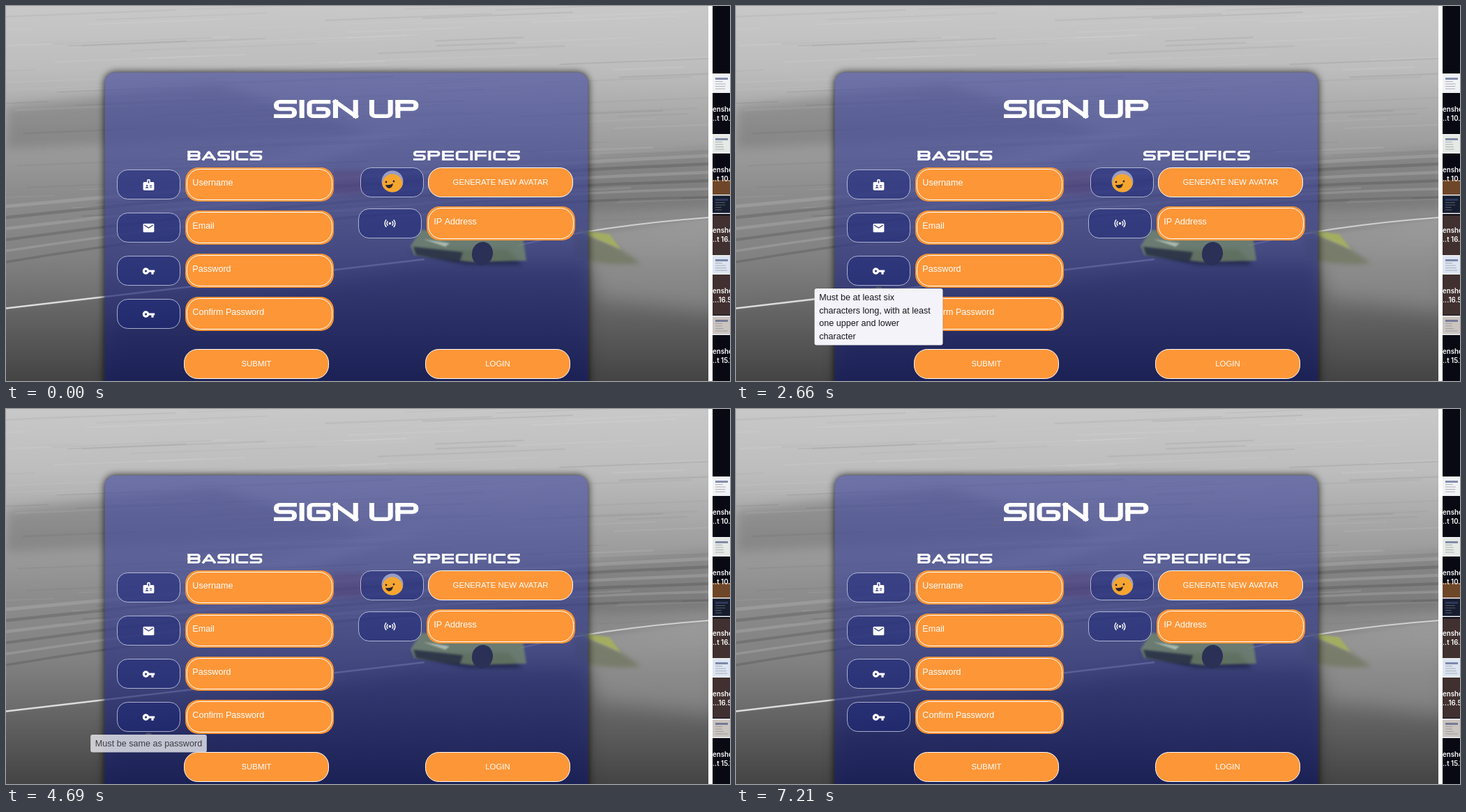
These frames come from a looping animation (1038x539 px, 7560 ms). An HTML page with a canvas:

```html
<!DOCTYPE html>
<html lang="en">
<head>
<meta charset="utf-8">
<title>Sign up</title>
<style>
html, body { margin: 0; width: 100%; height: 100%; overflow: hidden; background: #fff; }
canvas { display: block; }
</style>
</head>
<body>
<canvas id="stage" width="1038" height="539" role="img" aria-label="Sign up form with tooltips"></canvas>
<script>
const W = 1038, H = 539, LOOP = 7560, STEP = 70, FADE = 200;
const SANS = '"Liberation Sans", Arial, sans-serif';
const TEXT = `12.6px ${SANS}`;
const ORANGE = '#fd9637';
const view = document.getElementById('stage').getContext('2d');
const page = document.createElement('canvas');
page.width = W; page.height = H;
const g = page.getContext('2d');

let seed = 11;
const rnd = () => (seed = (seed * 16807) % 2147483647) / 2147483647;

// Evenly spaced colours from y0 to y1.
function shade(y0, y1, ...colors) {
  const grad = g.createLinearGradient(0, y0, 0, y1);
  colors.forEach((color, i) => grad.addColorStop(i / (colors.length - 1), color));
  return grad;
}

function soft(d, fill, blur) {
  g.save();
  g.filter = `blur(${blur}px)`;
  g.fillStyle = fill;
  g.fill(new Path2D(d));
  g.restore();
}

function curve(d, color, width) {
  g.strokeStyle = color;
  g.lineWidth = width;
  g.stroke(new Path2D(d));
}

function box(c, x, y, w, h, r, fill, line) {
  c.beginPath();
  c.roundRect(x, y, w, h, r);
  if (fill) { c.fillStyle = fill; c.fill(); }
  if (line) { c.strokeStyle = line; c.lineWidth = 1; c.stroke(); }
}

function label(c, str, x, y, font, color = '#fff', align = 'left') {
  c.font = font;
  c.fillStyle = color;
  c.textAlign = align;
  c.fillText(str, x, y);
}

function photo() {
  g.fillStyle = shade(0, H, '#c8c8c8', '#bdbdbd', '#a2a2a2', '#8c8c8c', '#828282', '#666', '#484848');
  g.fillRect(0, 0, W, H);
  soft('M0 145L300 112L520 180L0 205z', 'rgba(80,80,80,.3)', 8);
  soft('M230 245L640 160L420 235z', 'rgba(215,215,220,.3)', 7);
  soft('M420 255L1010 205V290L640 300z', 'rgba(80,80,80,.25)', 6);
  for (let i = 0; i < 150; i++) {
    const x = rnd() * 1000 - 80, y = rnd() * 320, len = 60 + rnd() * 260;
    const tone = rnd() < .5 ? '60,60,60' : '235,235,235';
    curve(`M${x} ${y}l${len} ${-len * .04}`, `rgba(${tone},${.03 + rnd() * .08})`, 1 + rnd() * 2);
  }
  // guard rails converge towards the right
  for (let i = 0; i < 6; i++)
    curve(`M0 ${288 + i * 16}Q500 ${240 + i * 9} 1007 ${215 + i * 12}`, `rgba(${i % 2 ? '60,60,60' : '200,200,200'},.25)`, 5 - i / 3);
  soft('M468 236h44v36h-44z', 'rgba(150,50,45,.4)', 4);
  // road
  soft('M-20 440L600 367L1020 303V560H-20z', shade(300, H, '#999', '#777', '#5e5e5e', '#444'), 2);
  soft('M150 460L590 374L835 372V560H150z', 'rgba(40,40,40,.4)', 12);
  soft('M820 330L1020 303V440L850 420z', 'rgba(170,170,170,.4)', 14);
  curve('M0 434.5L141 418Q400 388 600 364', '#dcdcdc', 2.3);
  curve('M735 344Q850 316 1007 304', 'rgba(225,225,225,.8)', 2);
  // tail and wing
  soft('M815 330Q860 330 910 370Q860 375 815 362z', 'rgba(110,116,90,.7)', 3);
  soft('M815 321L865 328L882 350L845 334z', '#a3ad62', 1.5);
}

function carFront() {
  soft('M578 352L660 372L740 372L720 350z', 'rgba(20,26,50,.6)', 3);
  soft('M580 345L595 322L740 325L746 366L668 368L585 358z', 'rgba(126,150,105,.65)', 1.5);
  soft('M584 346L655 354L650 369L588 358z', 'rgba(38,46,70,.85)', 1.5);
  soft('M598 335L636 341L630 346z', 'rgba(215,225,215,.6)', 1);
  g.fillStyle = '#2b3156';
  g.beginPath(); g.ellipse(683, 356, 15, 17, .2, 0, 7); g.fill();
}

function panel() {
  // shadow only outside the translucent card
  const card = [141.5, 95.5, 693, 480, 15];
  const outside = new Path2D();
  outside.rect(0, 0, 1007, H);
  outside.roundRect(...card);
  g.save();
  g.clip(outside, 'evenodd');
  g.shadowColor = 'rgba(0,0,0,.85)';
  g.shadowBlur = 11;
  box(g, ...card, '#333');
  g.restore();
  box(g, ...card, shade(95, H, 'rgba(74,80,158,.68)', 'rgba(62,70,148,.69)', 'rgba(40,48,122,.74)', 'rgba(20,27,92,.8)'));
}

// Wide display lettering: each pair is a grid point on a 0-4 square.
const GLYPHS = {
  S: [1.27, '40 00 02 42 44 04'], I: [.28, '00 04'], G: [1.3, '40 00 04 44 42 22'],
  N: [1.38, '04 00|00 44|44 40'], U: [1.3, '00 04 44 40'], P: [1.27, '04 00|00 40 42 02'],
  B: [1.3, '00 04|00 40 42 02|02 42 44 04'], A: [1.42, '04 20 44|13 33'],
  C: [1.27, '40 00 04 44'], E: [1.2, '00 04|00 40|02 42|04 44'], F: [1.2, '00 04|00 40|02 42']
};

function wide(word, x, y, h, gap) {
  const pen = h * .21, broad = 1.3;
  g.save();
  g.translate(x, y);
  g.scale(broad, 1);
  g.strokeStyle = '#fff';
  g.lineWidth = pen;
  g.lineCap = 'square';
  g.lineJoin = 'round';
  let left = 0;
  for (const ch of word) {
    if (ch === ' ') { left += (h * .62 - gap) / broad; continue; }
    const [ratio, strokes] = GLYPHS[ch];
    const w = ratio * h / broad;
    for (const stroke of strokes.split('|')) {
      const pts = stroke.split(' ').map(p => [
        left + pen / 2 + p[0] / 4 * (w - pen), pen / 2 + p[1] / 4 * (h - pen)]);
      const last = pts.length - 1;
      g.beginPath();
      g.moveTo(...pts[0]);
      for (let i = 1; i < last; i++) g.arcTo(...pts[i], ...pts[i + 1], ch === 'A' ? h * .03 : h * .15);
      g.lineTo(...pts[last]);
      g.stroke();
    }
    left += w + gap / broad;
  }
  g.restore();
}

const ICONS = {
  badge: 'M20 7h-5V4c0-1.1-.9-2-2-2h-2c-1.1 0-2 .9-2 2v3H4c-1.1 0-2 .9-2 2v11c0 1.1.9 2 2 2h16c1.1 0 2-.9 2-2V9c0-1.1-.9-2-2-2zM11 4h2v5h-2zM9 12a1.5 1.5 0 1 1 0 3a1.5 1.5 0 1 1 0-3zM6 18c0-3 6-3 6 0zM14 13h4v1.5h-4zM14 16h4v1.5h-4z',
  mail: 'M20 4H4c-1.1 0-2 .9-2 2v12c0 1.1.9 2 2 2h16c1.1 0 2-.9 2-2V6c0-1.1-.9-2-2-2zm0 4l-8 5-8-5V6l8 5 8-5v2z',
  key: 'M12.65 10C11.83 7.67 9.61 6 7 6c-3.31 0-6 2.69-6 6s2.69 6 6 6c2.61 0 4.83-1.67 5.65-4H17v4h4v-4h2v-4H12.65zM7 14c-1.1 0-2-.9-2-2s.9-2 2-2 2 .9 2 2-.9 2-2 2z'
};

function icon(name, x, y) {
  g.save();
  g.translate(x, y);
  g.scale(.79, .79);
  g.translate(-12, -12);
  g.fillStyle = '#fff';
  g.fill(new Path2D(ICONS[name]), 'evenodd');
  g.restore();
}

function signal(x, y) {
  g.fillStyle = g.strokeStyle = '#fff';
  g.lineWidth = 1.5;
  g.beginPath(); g.arc(x, y, 1.8, 0, 7); g.fill();
  for (const r of [4.4, 7.4]) for (const a of [0, Math.PI]) {
    g.beginPath(); g.arc(x, y, r, a - .8, a + .8); g.stroke();
  }
}

function avatar(x, y) {
  const disc = (dx, dy, r, color) => {
    g.fillStyle = color;
    g.beginPath(); g.arc(dx, dy, r, 0, 7); g.fill();
  };
  g.save();
  g.translate(x, y);
  g.beginPath(); g.arc(0, 0, 15.5, 0, 7); g.clip();
  disc(0, 0, 16, '#989dc4');
  disc(0, 4, 14.5, '#f6a630');
  disc(-9, 1, 1.4, '#2c2430');
  disc(2, 0, 1.4, '#2c2430');
  g.fill(new Path2D('M-10 5Q-4 6 1 3Q0 10-5 10Q-9 9-10 5'));
  g.restore();
}

const chip = (x, y) => box(g, x + .5, y + .5, 90, 42, 15, 'rgba(28,38,120,.5)', 'rgba(225,228,245,.7)');

function field(x, y, str) {
  box(g, x, y, 213, 49, 19, ORANGE);
  box(g, x + 2.5, y + 2.5, 208, 44, 19, null, '#fff');
  label(g, str, x + 10.3, y + 26, TEXT);
}

function button(x, y, str) {
  box(g, x + .5, y + .5, 207, 42, 19, ORANGE, '#fff');
  label(g, str, x + 104, y + 25, `11.4px ${SANS}`, '#fff', 'center');
}

function form() {
  wide('SIGN UP', 384, 135, 26, 3.6);
  wide('BASICS', 260.5, 208, 14, 2.3);
  wide('SPECIFICS', 584, 208, 14, 2.8);
  [['Username', 'badge'], ['Email', 'mail'], ['Password', 'key'], ['Confirm Password', 'key']].forEach(([str, name], i) => {
    const y = 235 + i * 62;
    chip(159, y);
    icon(name, 204.5, y + 22);
    field(257, y - 3, str);
  });
  chip(508, 232);
  avatar(554, 252);
  button(605, 232, 'GENERATE NEW AVATAR');
  chip(505, 291);
  signal(550.5, 312.5);
  field(603, 288, 'IP Address');
  button(255, 493, 'SUBMIT');
  button(601, 493, 'LOGIN');
}

function desktop() {
  const x = 1013, w = 25, gap = 87;
  const rect = (y, h, color) => { g.fillStyle = color; g.fillRect(x, y, w, h); };
  g.fillStyle = '#fff';
  g.fillRect(1007, 0, 31, H);
  rect(0, H, '#090914');
  rect(250, 21, '#6e4728');
  rect(301, 143, '#40302f');
  ['#f0f2f5', '#e6eae6', '#161d2e', '#dce5f1', '#cbc4bf'].forEach((color, i) => {
    const top = 97 + i * gap;
    rect(top, 28, '#f0f0f2');
    rect(top + 1.5, 25, color);
    g.fillStyle = 'rgba(60,75,125,.6)';
    g.fillRect(x + 4, top + 6, 18, 3);
    g.fillStyle = 'rgba(130,135,145,.6)';
    for (let k = 0; k < 4; k++) g.fillRect(x + 4, top + 11 + k * 3.5, 8 + rnd() * 10, 1);
  });
  ['..t 10.1', '..t 10.1', '..t 16.4', '...16.5', '..t 15.1'].forEach((tail, i) => {
    const y = 151.5 + i * gap;
    label(g, 'ensho', x, y, '600 9.7px Inter, sans-serif');
    label(g, tail, x, y + 13, '600 9.7px Inter, sans-serif');
  });
}

// Each tip hangs below the chip centred at x and is hovered from show to hide.
const TIPS = [
  { x: 204.5, y: 282, show: 190, hide: 680, text: 'Must be a valid username' },
  { x: 204.5, y: 344, show: 890, hide: 2010, text: 'Must contain at least two\ncharcters seperated by an @' },
  { x: 204.5, y: 406, show: 2080, hide: 3410, text: 'Must be at least six\ncharacters long, with at least\none upper and lower\ncharacter' },
  { x: 204.5, y: 468, show: 4110, hide: 4630, text: 'Must be same as password' },
  { x: 551, y: 338, show: 5930, hide: 6980, text: "Must contain four number\nbetween 0 and 256 seperate\nby 4 .'s eg 123.123.123.123" }
];

const clamp = v => Math.max(0, Math.min(1, v));
const ease = v => v * v * (3 - 2 * v);

function tip({ x, y, show, hide, text }, t) {
  const alpha = ease(clamp((t - show) / FADE)) - ease(clamp((t - hide) / FADE));
  if (alpha <= 0) return;
  // grows to full size ahead of the fade, shrinks behind it
  const size = .75 + .25 * clamp(alpha * 1.5);
  const lines = text.split('\n');
  view.save();
  view.font = TEXT;
  const w = lines.length > 1 ? 184 : view.measureText(text).width + 13.4;
  view.translate(x, y);
  view.scale(size, size * size);
  view.globalAlpha = alpha;
  view.fillStyle = '#555866';
  view.fill(new Path2D('M-5 0L-3-2.5H3L5 0z'));
  view.shadowColor = 'rgba(0,0,0,.3)';
  view.shadowBlur = 2;
  box(view, -w / 2, 0, w, 7 + lines.length * 18.6, 3, '#f3f3f9');
  view.shadowBlur = 0;
  lines.forEach((str, i) => label(view, str, 6.7 - w / 2, 17.2 + i * 18.6, TEXT, '#16161c'));
  view.restore();
}

photo();
panel();
carFront();
form();
desktop();

const start = performance.now();
function draw() {
  const t = Math.floor(((performance.now() - start) % LOOP) / STEP) * STEP;
  view.drawImage(page, 0, 0);
  TIPS.forEach(item => tip(item, t));
  requestAnimationFrame(draw);
}
draw();
</script>
</body>
</html>
```
